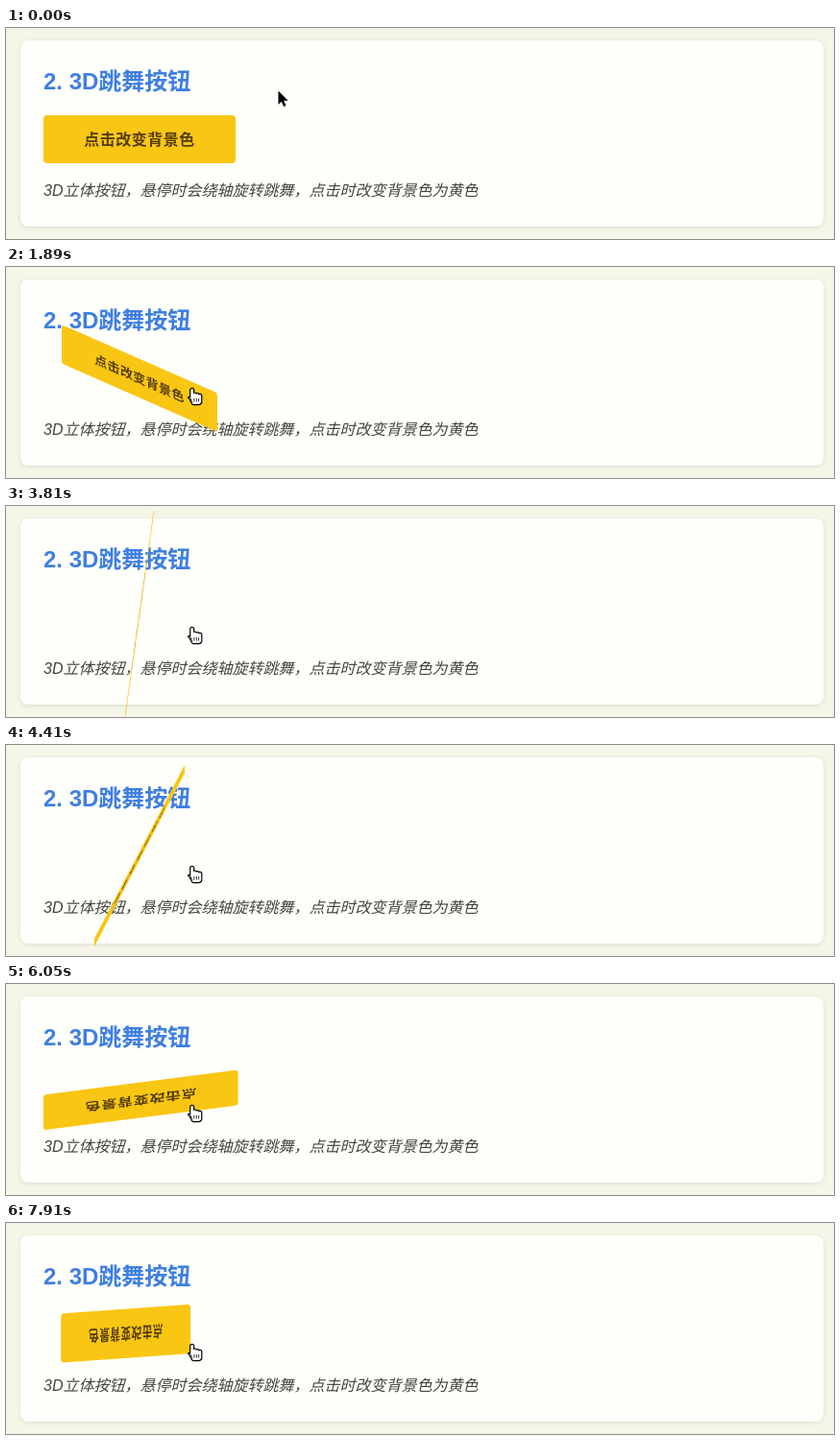
These frames come from a looping animation (862 px wide and 220 px high, 8000 ms). An HTML page with a canvas:

```html
<!DOCTYPE html>
<html lang="zh-CN">
<head>
<meta charset="utf-8">
<title>3D跳舞按钮</title>
<style>
  html, body { margin: 0; width: 100%; height: 100%; overflow: hidden; background: #f6f6e8; }
  canvas { display: block; width: 862px; height: 220px; }
</style>
</head>
<body>
<canvas id="stage"></canvas>
<script>
const W = 862, H = 220, LOOP = 8;
const HOVER = 0.75; // seconds until the pointer reaches the button
const SPIN = 32; // degrees per second
const FONT = '"Liberation Sans", "Noto Sans CJK SC", "Noto Sans CJK", sans-serif';
const canvas = document.getElementById('stage');
const ctx = canvas.getContext('2d');
const dpr = window.devicePixelRatio || 1;
canvas.width = W * dpr;
canvas.height = H * dpr;

const clamp = (v, max = 1) => Math.min(max, Math.max(0, v));
const lerp = (a, b, k) => a + (b - a) * k;
const rad = deg => deg * Math.PI / 180;

// The button turns about both axes; rotateX falls behind once it is past edge-on.
function poseAt(t) {
  const turn = SPIN * Math.max(0, t - HOVER);
  const lag = 45.6 * Math.sqrt(clamp((t - 3.8) / 4.1));
  const swell = Math.exp(-(((t - 3.5) / 0.6) ** 2));
  return {
    ax: rad(turn - lag),
    ay: rad(turn),
    scale: 1 + 0.03 * clamp((t - HOVER) / 4.4) + 0.075 * swell,
    depth: 6.3 * Math.max(0, t - 4.9),
    lift: -5 * swell
  };
}

function box(x, y, w, h, r, fill) {
  ctx.beginPath();
  ctx.roundRect(x, y, w, h, r);
  ctx.fillStyle = fill;
  ctx.fill();
}

function label(text, x, y, style, color, spacing = '0px') {
  ctx.font = style + ' ' + FONT;
  ctx.letterSpacing = spacing;
  ctx.fillStyle = color;
  ctx.fillText(text, x, y);
}

function drawPage() {
  ctx.fillStyle = '#f6f6e8';
  ctx.fillRect(0, 0, W, H);
  ctx.save();
  ctx.shadowColor = 'rgba(0, 0, 0, 0.1)';
  ctx.shadowBlur = 5 * dpr;
  ctx.shadowOffsetY = dpr;
  box(15, 13, 836, 194, 8, '#fefefb');
  ctx.restore();
  label('2. 3D跳舞按钮', 39, 64, 'bold 24px', '#3f7fe0');
  label('3D立体按钮，悬停时会绕轴旋转跳舞，点击时改变背景色为黄色', 39, 175, 'italic 16px', '#44443f');
}

function drawButton(t) {
  const { ax, ay, scale, depth, lift } = poseAt(t);
  const sinX = Math.sin(ax), cosX = Math.cos(ax);
  const sinY = Math.sin(ay), cosY = Math.cos(ay);
  ctx.save();
  // flat projection of rotateX · rotateY · translateZ
  ctx.translate(139 + depth * sinY, 116 + lift - depth * sinX * cosY);
  ctx.transform(scale * cosY, scale * sinX * sinY, 0, scale * cosX, 0, 0);
  box(-100, -25, 200, 50, 4, '#f9c614');
  label('点击改变背景色', -57.75, 6, 'bold 16px', '#553d0c', '0.5px');
  ctx.restore();
}

function drawArrow() {
  const arrow = new Path2D('M0 0V14.2L3.3 11.2L5.6 16.6L8 15.6L5.7 10.3H10.2Z');
  ctx.strokeStyle = '#fff';
  ctx.lineWidth = 2;
  ctx.stroke(arrow);
  ctx.fillStyle = '#000';
  ctx.fill(arrow);
}

function drawHand() {
  const hand = new Path2D();
  hand.roundRect(-1.2, 0, 2.8, 13, 1.4);
  for (let i = 0; i < 3; i++) hand.roundRect(1.6 + i * 2.7, 4.6 + i * 0.7, 2.7, 9, 1.3);
  hand.roundRect(0, 9, 9, 7, 2);
  hand.addPath(new Path2D('M-1 10L-3.2 9L1.5 14.5'));
  ctx.strokeStyle = '#000';
  ctx.lineWidth = 2.4;
  ctx.stroke(hand);
  ctx.fillStyle = '#fff';
  ctx.fill(hand);
  ctx.fillStyle = '#000';
  for (let i = 0; i < 3; i++) ctx.fillRect(2 + i * 2.4, 10, 0.8, 3.5);
}

function drawCursor(t) {
  const p = clamp((t - 0.25) / 0.9);
  const k = p * p * (3 - 2 * p);
  ctx.save();
  ctx.translate(lerp(283.5, 193.5, k), lerp(65.5, 127, k));
  ctx.lineJoin = 'round';
  if (t < HOVER) drawArrow();
  else drawHand();
  ctx.restore();
}

function render(t) {
  ctx.setTransform(dpr, 0, 0, dpr, 0, 0);
  drawPage();
  drawButton(t);
  drawCursor(t);
}

let start;
function tick(now) {
  if (start === undefined) start = now;
  render((now - start) / 1000 % LOOP);
  requestAnimationFrame(tick);
}
render(0);
requestAnimationFrame(tick);
</script>
</body>
</html>
```
